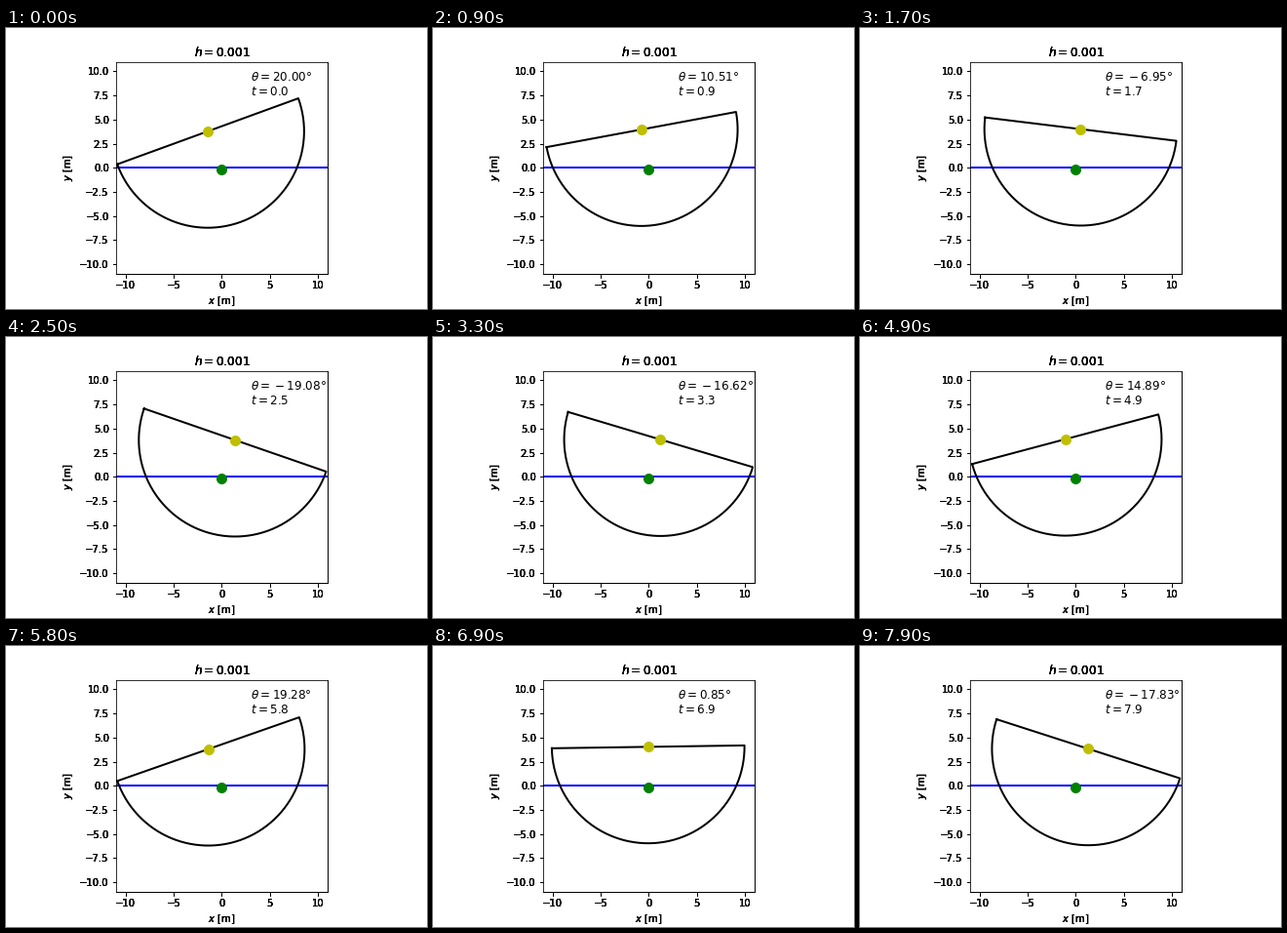
Recreate the animation shown at these times as a matplotlib script. Size 432 by 288 pixels, loop 8 s.

```python
import numpy as np
import matplotlib.pyplot as plt
from matplotlib.animation import FuncAnimation

FRAMES, INTERVAL = 80, 100
R, G, H = 10.0, 9.81, 0.001
LAYERS = 6  # labels overprint on a transparent margin

COM = 4 * R / (3 * np.pi)             # circle centre to centre of mass
INERTIA = R**2 / 2 - COM**2           # per unit mass
STEPS = round(INTERVAL / 1000 / H)


def floating_height():
    """Height of the circle centre at which half the hull is submerged."""
    lo, hi = 0.0, R
    for _ in range(60):
        d = (lo + hi) / 2
        area = R**2 * np.arccos(d / R) - d * np.sqrt(R**2 - d**2)
        lo, hi = (d, hi) if area > np.pi * R**2 / 4 else (lo, d)
    return lo


def solve():
    """Forward Euler for the rolling angle, sampled once per frame."""
    theta, omega, out = np.radians(20), 0.0, []
    for n in range(FRAMES * STEPS):
        if n % STEPS == 0:
            out.append(theta)
        accel = -G * COM / INERTIA * np.sin(theta)
        theta, omega = theta + H * omega, omega + H * accel
    return out


def make_axes(fig):
    ax = fig.add_axes([0.125, 0.125, 0.775, 0.755])
    ax.set_aspect("equal")
    ax.set(xlim=(-11, 11), ylim=(-11, 11),
           xticks=np.arange(-10, 11, 5), yticks=np.arange(-10, 10.1, 2.5))
    ax.set_xlabel("$x$ [m]")
    ax.set_ylabel("$y$ [m]")
    ax.set_title("$h=0.001$")
    return ax


angles = solve()
y_com = floating_height() - COM

fig = plt.figure(figsize=(6, 4), dpi=72, facecolor="white")
ax = [make_axes(fig) for _ in range(LAYERS)][-1]

ax.plot([-11, 11], [0, 0], "b", lw=2)
hull, = ax.plot([], [], "k", lw=2)
centre, = ax.plot([], [], "yo", ms=10)
ax.plot([0], [y_com], "go", ms=10)
angle_text = ax.text(3, 9, "", fontsize=12)
time_text = ax.text(3, 7.5, "", fontsize=12)

arc = np.linspace(-np.pi, 0, 181)


def update(i):
    th = angles[i]
    xc, yc = -COM * np.sin(th), y_com + COM * np.cos(th)
    x, y = xc + R * np.cos(arc + th), yc + R * np.sin(arc + th)
    hull.set_data(np.append(x, x[0]), np.append(y, y[0]))
    centre.set_data([xc], [yc])
    # the empty group keeps the minus sign spaced as an operator
    gap = "{}" if th < 0 else ""
    angle_text.set_text(rf"$\theta={gap}{np.degrees(th):.2f}\degree$")
    time_text.set_text(f"$t={i * INTERVAL / 1000:.1f}$")
    return hull, centre, angle_text, time_text


anim = FuncAnimation(fig, update, frames=FRAMES, interval=INTERVAL,
                     repeat=True, repeat_delay=0)
plt.show()
```
